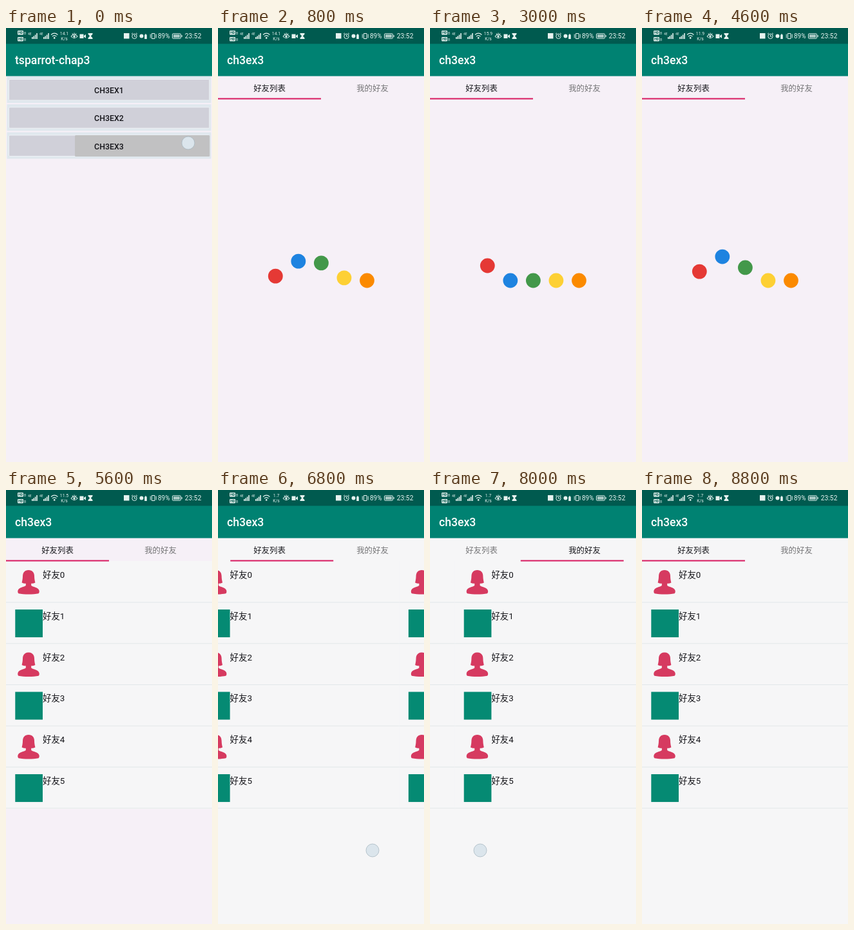
An HTML page for the animation above (9 s loop, 320 px wide and 672 px high).

```html
<!DOCTYPE html>
<html lang="zh">
<head>
<meta charset="utf-8">
<title>ch3ex3</title>
<style>
html, body { margin: 0; width: 100%; height: 100%; overflow: hidden; background: #f6f0f7; }
svg { display: block; width: 320px; height: 672px; font-family: Roboto, "Noto Sans CJK SC", "Noto Sans CJK", sans-serif; }
.title { font-size: 17.6px; font-weight: 500; fill: #fff; }
.button { font-size: 12.4px; font-weight: 500; fill: #15151a; text-anchor: middle; }
.tab { font-size: 12.4px; text-anchor: middle; }
.name { font-size: 13.4px; fill: #15151a; }
.status { fill: #e6f2ef; stroke: none; }
.status .line { fill: none; stroke: #e6f2ef; }
</style>
</head>
<body>
<svg viewBox="0 0 320 672">
  <defs>
    <g id="signal">
      <text y="11" font-size="5">4E</text>
      <path d="M6 14h1.6v3H6zM8.4 12.5H10V17H8.4zM10.8 10.5h1.6V17h-1.6zM13.2 8h1.6v9h-1.6z"/>
    </g>
    <g id="hd">
      <rect width="9" height="6.4" rx="1"/>
      <text x="1" y="5.2" font-size="5.4" font-weight="700" fill="#005a4f">HD</text>
      <text x="10" y="5.6" font-size="5">B</text>
    </g>
    <path id="person" fill="#d63a60" d="M35 124c-6 0-9 4-9 9.5 0 4-.8 7-1.4 10 1.8 1 4 1.3 6.2 1.2v3.4c-2.6 2.4-10.6 2.2-12.3 7.4-.5 2-.2 3.8 1 4.7 8 1.8 23 1.8 31 0 1.2-.9 1.5-2.7 1-4.7-1.7-5.2-9.7-5-12.3-7.4v-3.4c2.2.1 4.4-.2 6.2-1.2-.6-3-1.4-6-1.4-10 0-5.500-3-9.500-9-9.500z"/>
  </defs>

  <g id="home">
    <rect width="320" height="672" fill="#f6f0f7"/>
    <rect y="24" width="320" height="50.500" fill="#008272"/>
    <text class="title" x="14" y="56">tsparrot-chap3</text>
    <g id="buttons"></g>
  </g>

  <g id="app">
    <rect width="320" height="672" fill="#f6f0f7"/>
    <rect id="floor" y="74" width="320" height="598"/>
    <g id="balls"></g>
    <g id="pager"></g>
    <rect y="24" width="320" height="50.500" fill="#008272"/>
    <text class="title" x="14" y="56">ch3ex3</text>
    <text class="tab" x="80" y="97.500">好友列表</text>
    <text class="tab" x="240" y="97.500">我的好友</text>
    <rect id="marker" y="108.500" width="160" height="2" fill="#d81b60"/>
  </g>

  <circle id="touch" r="10" fill="#dbe5ec" stroke="#a9b9c2" stroke-width=".8"/>

  <rect width="320" height="24.500" fill="#005a4f"/>
  <g class="status">
    <use href="#hd" x="18" y="4"/>
    <use href="#hd" x="18" y="14"/>
    <use href="#signal" x="34"/>
    <use href="#signal" x="52"/>
    <path class="line" stroke-width="1.200" d="M70 10.500q5.200-4.600 10.400 0M72 13q3.200-2.800 6.400 0"/>
    <circle cx="75.200" cy="15.400" r="1.300"/>
    <g font-size="6.800" text-anchor="middle">
      <text id="rate" x="90.500" y="10.500"></text>
      <text x="90.500" y="18.500">K/s</text>
    </g>
    <path class="line" stroke-width="1.100" d="M101 13q5-6 10 0q-5 5.500-10 0M103 8.500l1 1.500M106 7.500v2M109 8.500l-1 1.500"/>
    <circle cx="106" cy="13" r="1.700"/>
    <path d="M114.500 9.500h6v6.500h-6zM121 12l3-2.200v6l-3-2.200z"/>
    <path d="M127.500 8h7v1.500l-2.600 3 2.600 3V17h-7v-1.500l2.600-3-2.600-3z"/>
    <rect x="183" y="8" width="8.500" height="8.500"/>
    <g class="line">
      <circle cx="199.500" cy="12.800" r="3.700"/>
      <path d="M199.500 10.500v2.500h2M195 9.500l2-1.800M204 9.500l-2-1.800"/>
    </g>
    <circle cx="210.500" cy="12.500" r="3"/>
    <path d="M215.200 10.500h3.600V17h-3.600zM216.200 9.300h1.600v1.200h-1.600z"/>
    <path class="line" d="M226.500 8.500h4.500v8h-4.500zM224.300 9.500v6M233.200 9.500v6"/>
    <text x="236" y="16" font-size="10">89%</text>
    <rect class="line" x="258.500" y="8.800" width="13" height="7.400" rx="1"/>
    <path d="M260 10.300h10v4.400h-10zM272.500 11h1.500v3h-1.500z" opacity=".75"/>
    <text x="277.800" y="16.200" font-size="10.300">23:52</text>
  </g>
</svg>
<script>
const LOOP = 9000, STEP = 200;
const $ = id => document.getElementById(id);

function add(parent, tag, attrs, text = '') {
  const el = document.createElementNS('http://www.w3.org/2000/svg', tag);
  for (const key in attrs) el.setAttribute(key, attrs[key]);
  el.textContent = text;
  return parent.appendChild(el);
}

// Value of a [time, value] table, linear between entries.
function tween(keys, t) {
  const i = keys.findIndex(k => k[0] > t);
  if (i === 0) return keys[0][1];
  if (i < 0) return keys[keys.length - 1][1];
  const [a, u] = keys[i - 1], [b, v] = keys[i];
  return u + (v - u) * (t - a) / (b - a);
}

const hold = (keys, t) => keys.filter(k => k[0] <= t).pop()[1];
const show = (el, on) => el.setAttribute('visibility', on ? 'inherit' : 'hidden');

let ripple;
[79.5, 122.7, 166].forEach((y, i) => {
  const box = $('buttons');
  add(box, 'rect', { x: 1.5, y: y - 4.5, width: 317, height: 41, fill: '#e0e8ee' });
  add(box, 'rect', { x: 4.5, y, width: 311.5, height: 32.5, rx: 1.5, fill: '#d0d0d9', stroke: '#eef2f6' });
  if (i === 2) ripple = add(box, 'rect', { y, height: 33, rx: 1.5, fill: '#c1c1c2' });
  add(box, 'text', { class: 'button', x: 160, y: y + 21.7 }, 'CH3EX' + (i + 1));
});

const balls = ['#e53935', '#1e83e0', '#43984a', '#fdd034', '#fb8a00'].map((fill, i) =>
  add($('balls'), 'circle', { cx: 89.3 + 35.55 * i, r: 11.4, fill }));

const ROW = 63.75;
for (let page = 0; page < 2; page++) {
  const list = add($('pager'), 'g', { transform: `translate(${page * 320} 0)` });
  add(list, 'rect', { y: 110, width: 320, height: 384, fill: '#f6f6f7' });
  for (let i = 0; i < 6; i++) {
    const row = add(list, 'g', { transform: `translate(0 ${i * ROW})` });
    if (i % 2) add(row, 'rect', { x: 14.3, y: 121.3, width: 42.7, height: 43, fill: '#058a73' });
    else add(row, 'use', { href: '#person' });
    add(row, 'text', { class: 'name', x: 57, y: 136 }, '好友' + i);
    add(row, 'rect', { y: 173.5, width: 320, height: 1, fill: '#e2e7e9' });
  }
}

const rates = [[0, '14.1'], [1200, '15.9'], [3800, '11.9'], [5400, '11.5'], [6800, '1.7']];
const slide = [[200, 320], [400, 130], [600, 0]];
const swipe = [[6600, 0], [6800, .12], [7000, .6], [7200, 1], [7800, 1], [8000, .88], [8200, .35], [8400, 0]];
const fingers = [[0, [283, 178]], [400, null], [6800, [240, 558]], [7000, [86, 558]], [7200, null],
  [8000, [78, 558]], [8200, [248, 558]], [8400, null]];
const LOADED = 5200;
const jump = { period: 1284, start: 263, half: 293.6, lag: 169, height: 40 };

function ballY(i, t) {
  const { period, start, half, lag, height } = jump;
  const age = ((t - start - lag * i) % period + period) % period;
  return 391 - height * Math.max(0, 1 - Math.abs(age / half - 1));
}

function draw(t) {
  const left = t < STEP ? 107 : 4;
  ripple.setAttribute('x', left);
  ripple.setAttribute('width', 316.5 - left);

  show($('app'), t >= 400);
  $('app').setAttribute('transform', `translate(${tween(slide, t)} 0)`);
  $('floor').setAttribute('fill', t < 6800 ? '#f6f0f7' : '#f6f6f7');

  show($('balls'), t >= 400 && t < LOADED);
  balls.forEach((ball, i) => ball.setAttribute('cy', ballY(i, t)));

  const p = tween(swipe, t);
  show($('pager'), t >= LOADED);
  $('pager').setAttribute('transform', `translate(${-320 * p} 0)`);
  $('marker').setAttribute('x', 160 * p);
  document.querySelectorAll('.tab').forEach((tab, i) =>
    tab.setAttribute('fill', (p > .5) === (i === 1) ? '#15151a' : '#747476'));

  const finger = hold(fingers, t);
  show($('touch'), finger);
  if (finger) $('touch').setAttribute('transform', `translate(${finger})`);

  $('rate').textContent = hold(rates, t);
}

const begin = performance.now();
function tick() {
  const t = (performance.now() - begin) % LOOP;
  draw(Math.floor(t / STEP) * STEP);
  requestAnimationFrame(tick);
}
tick();
</script>
</body>
</html>
```
